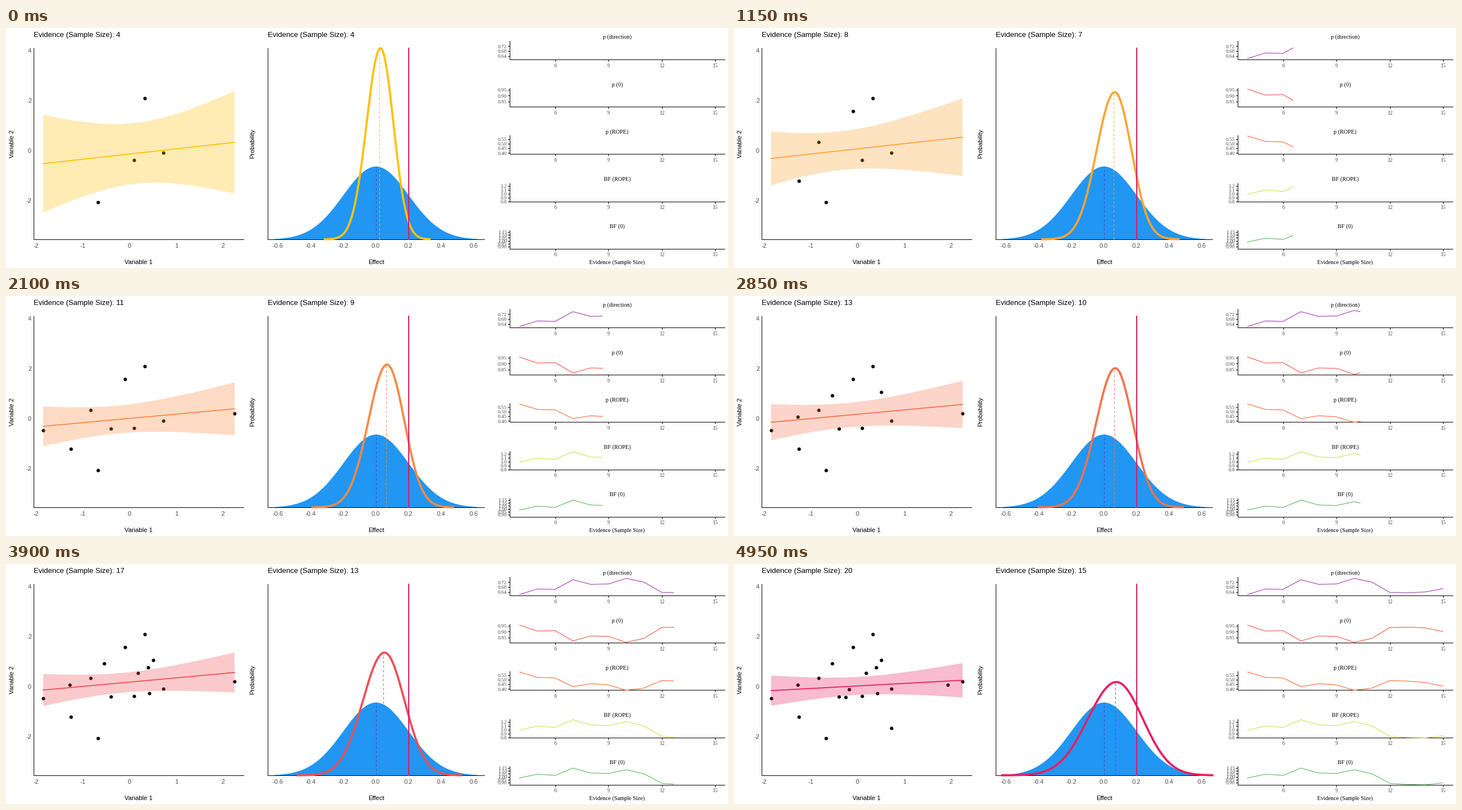
Recreate the animation shown at these times as a matplotlib script. Size 1280 by 427 pixels, loop 5 s.

```python
import numpy as np
import matplotlib.pyplot as plt
from matplotlib.animation import FuncAnimation
from matplotlib.colors import LinearSegmentedColormap

W, H, DPI = 1280, 427, 64
FRAMES, INTERVAL = 100, 50
PT = 72 / DPI  # points per pixel
SANS, SERIF = "Liberation Sans", "Liberation Serif"
GREY = "#4D4D4D"
BASE = 376  # axis height of the two large panels
RAMP = LinearSegmentedColormap.from_list(
    "evidence", ["#FFC107", "#FEA235", "#F87E48", "#F05754", "#E91E63"])

fig = plt.figure(figsize=(W / DPI, H / DPI), dpi=DPI, facecolor="white")
ax = fig.add_axes([0, 0, 1, 1])
ax.set_xlim(0, W)
ax.set_ylim(H, 0)
ax.axis("off")


def text(x, y, s, size, font=SANS, color="black", ha="center", **kw):
    kw.setdefault("va", "baseline")
    return ax.text(x, y, s, fontsize=size * PT, family=font, color=color,
                   ha=ha, **kw)


def line(x, y, color="black", width=1, **kw):
    kw.setdefault("zorder", 3)
    return ax.plot(x, y, color=color, lw=width * PT, **kw)[0]


def dashed(x, y, color, zorder):
    return line(x, y, color, ls=(0, (4, 4)), dash_capstyle="butt", zorder=zorder)


def large_panel(left, right, x_name, y_name):
    line([left, left], [36, BASE])
    line([left, right], [BASE, BASE])
    text((left + right) / 2, 420, x_name, 11.3)
    text(left - 38 if left < 100 else left - 27, 206, y_name, 11.3,
         rotation=90, va="center")
    return text(left, 16, "", 13, ha="left")


# Left panel: scatter and regression fit
POINTS = np.array([
    (0.33, 2.09), (0.73, -0.10), (0.10, -0.38), (-0.68, -2.07), (-0.10, 1.57),
    (-0.83, 0.34), (-1.26, -1.22), (-1.85, -0.48), (-0.40, -0.40), (2.25, 0.20),
    (-1.28, 0.06), (-0.54, 0.93), (0.51, 1.06), (0.40, 0.76), (0.18, 0.53),
    (0.42, -0.27), (-0.18, -0.11), (-0.25, -0.43), (0.73, -1.66), (1.93, 0.06),
])
FIT_X = np.linspace(-1.85, 2.25, 40)


def left_x(v):
    return 219 + 82.75 * v


def left_y(v):
    return 218 - 44.5 * v


def regress(n):
    """Centre and half-width of the 90% band from the first n points."""
    x, y = POINTS[:n].T
    dx = x - x.mean()
    var = y.var()
    precision = n + dx @ dx / var  # shrinks the slope towards zero
    slope = dx @ y / var / precision
    offset = FIT_X - x.mean()
    half = 1.645 * np.sqrt(var / n + offset ** 2 / precision)
    return np.array([y.mean() + slope * offset, half])


FITS = {n: regress(n) for n in range(4, 21)}

fit_title = large_panel(49, 421, "Variable 1", "Variable 2")
for v in (-2, 0, 2, 4):
    text(45, left_y(v) + 4, str(v), 11, color=GREY, ha="right")
for v in range(-2, 3):
    text(left_x(v), 391, str(v), 11, color=GREY)
dots = line([], [], marker="o", ls="none", ms=6.2 * PT, mew=0)
ribbon = ax.fill([0, 1, 1], [0, 0, 1], alpha=0.3, lw=0, zorder=4)[0]
fit = line([], [], width=1.8, zorder=5)

# Middle panel: prior and posterior
EFFECT_0 = 655.5


def bell(x, centre, height, spread):
    return BASE - height * np.exp(-((x - centre) / spread) ** 2 / 2)


post_title = large_panel(464, 848, "Effect", "Probability")
for k in range(-3, 4):
    text(EFFECT_0 + 58 * k, 391, f"{0.2 * k:.1f}", 11, color=GREY)
prior_x = np.linspace(475, 836, 300)
ax.fill_between(prior_x, BASE, bell(prior_x, EFFECT_0, 130, 58),
                color="#2196F3", lw=0, zorder=2)
dashed([656, 656], [BASE, 246], "#673AB7", 4)
post = line([], [], width=3.8, zorder=5)
mean = dashed([], [], "black", 6)
line([714, 714], [36, BASE], "#D81B60", 2, zorder=7)

# Right panel: five indices that follow one shared signal.
# Each has: title, colour, ticks (first, step, count, height, gap, decimals)
# and curve (height at zero, gain, drift per sample).
SIZES = np.arange(4, 16)
SIGNAL = [0.08, 0.38, 0.36, 0.88, 0.63, 0.65, 0.95, 0.75, 0.2, 0.18, 0.22, 0.4]
INDICES = [
    ("p (direction)", "#9C27B0", (0.72, -0.04, 3, 32, 8.75, 2), (57, -33, 0)),
    ("p (0)", "#F44336", (0.95, -0.05, 3, 109.5, 10.5, 2), (106, 35, 0)),
    ("p (ROPE)", "#FF5722", (0.55, -0.05, 4, 197.5, 8.2, 2), (190, 27, 1.5)),
    ("BF (ROPE)", "#CDDC39", (1.2, -0.1, 5, 281, 6.9, 1), (298, -30, 1.8)),
    ("BF (0)", "#4CAF50", (1.15, -0.05, 6, 363, 5.2, 2), (383, -28, 1.6)),
]


def size_x(n):
    return 973.5 + 31.5 * (n - 6)


curves = []
for k, (name, color, ticks, shape) in enumerate(INDICES):
    top = 84.25 * k
    floor = round(56 + top)
    text(1083.5, 19 + top, name, 10.3, SERIF)
    line([893, 893], [floor - 33, floor])
    line([893, 1274], [floor, floor])
    first, step, count, height, gap, decimals = ticks
    for j in range(count):
        y = height + gap * j
        line([890, 893], [y, y])
        text(888, y + 3.5, f"{first + step * j:.{decimals}f}", 9.3, SERIF,
             GREY, "right")
    for n in (6, 9, 12, 15):
        line([size_x(n)] * 2, [floor, floor + 3])
        text(size_x(n), 69.5 + top, str(n), 9.5, SERIF, GREY)
    curves.append((line([], [], color, zorder=4), shape))
text(1083.5, 420, "Evidence (Sample Size)", 10.3, SERIF)


def draw_fit(n, color):
    fit_title.set_text(f"Evidence (Sample Size): {round(n)}")
    low = int(n + 1e-9)
    dots.set_data(left_x(POINTS[:low, 0]), left_y(POINTS[:low, 1]))
    nxt = FITS[min(low + 1, 20)]
    centre, half = FITS[low] + (nxt - FITS[low]) * (n - low)
    edge = np.r_[centre + half, (centre - half)[::-1]]
    ribbon.set_xy(np.column_stack([left_x(np.r_[FIT_X, FIT_X[::-1]]),
                                   left_y(edge)]))
    ribbon.set_facecolor(color)
    fit.set_data(left_x(FIT_X), left_y(centre))
    fit.set_color(color)


def draw_posterior(n, color):
    post_title.set_text(f"Evidence (Sample Size): {round(n)}")
    peak = np.interp(n, [4, 6.5, 10.3, 12.7, 15], [664, 675, 676, 671, 678])
    height = np.interp(n, [4, 5.4, 10.3, 12.7, 15], [340, 266, 248, 218, 166])
    spread = 8000 / height  # constant area
    x = np.linspace(peak - 4.2 * spread, min(peak + 3.7 * spread, 848), 240)
    skewed = spread * np.where(x < peak, 1.05, 0.97)
    post.set_data(x, bell(x, peak, height, skewed))
    post.set_color(color)
    mean.set_data([peak - 2, peak - 2], [BASE, BASE - height])
    mean.set_color(color)


def draw_indices(n):
    shown = np.append(SIZES[SIZES < n], n)
    for curve, (zero, gain, drift) in curves:
        y = zero + gain * np.interp(shown, SIZES, SIGNAL) + drift * (shown - 4)
        curve.set_data(size_x(shown), y)


def update(i):
    t = i / (FRAMES - 1)
    color = RAMP(t)
    draw_fit(4 + 16 * t, color)
    draw_posterior(4 + 11 * t, color)
    draw_indices(4 + 11 * t)


anim = FuncAnimation(fig, update, frames=FRAMES, interval=INTERVAL,
                     init_func=lambda: update(0), repeat=True, repeat_delay=0)
plt.show()
```
